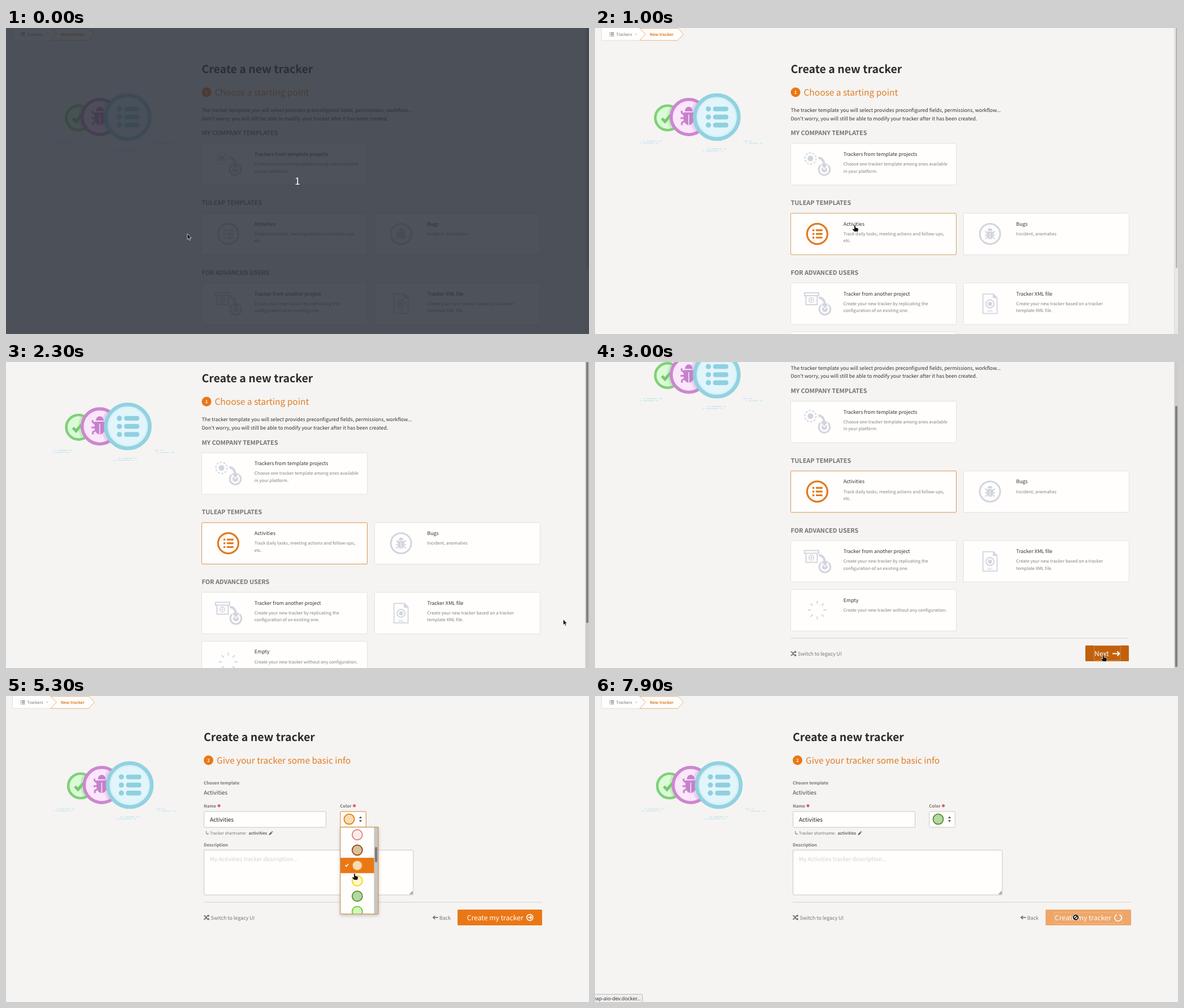
An HTML page that plays this animation: 1032 by 543 pixels, repeating every 8 s.

```html
<!DOCTYPE html>
<html lang="en">
<head>
<meta charset="utf-8">
<title>Create a new tracker</title>
<style>
html, body { margin: 0; width: 100%; height: 100%; overflow: hidden; background: #f5f4f2; }
svg { display: block; width: 100vw; height: 100vh; }
text { font-family: "Noto Sans CJK JP", "Noto Sans CJK SC", "Noto Sans CJK", "Open Sans", sans-serif; text-rendering: geometricPrecision; white-space: pre; }
</style>
</head>
<body>
<svg id="stage" viewBox="0 0 1032 543"></svg>
<script>
const LOOP = 8000, UNIT = 0.5528;
const ORANGE = '#ea7716', INK = '#333', MUTED = '#757575', ICON = '#d2d5de', WHITE = '#fffefd';

// Shape helpers
const text = (x, y, str, size = 16, fill = INK, weight = 400, extra = '') =>
  `<text x="${x}" y="${y}" font-size="${(size * UNIT * (weight > 400 ? 0.98 : 1)).toFixed(2)}" fill="${fill}" font-weight="${weight}" ${extra}>${str}</text>`;
const rect = (x, y, w, h, fill, extra = '') =>
  `<rect x="${x}" y="${y}" width="${w}" height="${h}" fill="${fill}" ${extra}/>`;
const disc = (x, y, r, fill, stroke = 'none', width = 0, extra = '') =>
  `<circle cx="${x}" cy="${y}" r="${r}" fill="${fill}" stroke="${stroke}" stroke-width="${width}" ${extra}/>`;
const line = (d, stroke, width = 1, extra = '') =>
  `<path d="${d}" fill="none" stroke="${stroke}" stroke-width="${width}" ${extra}/>`;
const fill = (d, color, extra = '') => `<path d="${d}" fill="${color}" ${extra}/>`;
const group = (id, body, extra = '') => `<g id="${id}" ${extra}>${body}</g>`;
const at = (x, y, body, scale = 1) => `<g transform="translate(${x} ${y}) scale(${scale})">${body}</g>`;
const ROUND = 'stroke-linecap="round" stroke-linejoin="round"';

// Icons, centred on 0,0
const bug = (color, gap) =>
  fill('M-7-9A7 8 0 0 1 7-9Z', color) +
  fill('M-9.5-7H9.5V4A9.5 12 0 0 1-9.5 4Z', color) +
  line('M-15 3.5H15M-9-3L-13-6.5V-10M9-3L13-6.5V-10M-8 9L-12.5 12V16M8 9L12.5 12V16', color, 3, 'stroke-linejoin="round"') +
  line('M0-3V16', gap, 1.6);

const list = (color, ring) => (ring ? disc(0, 0, 18, 'none', color, 3.2) : '') +
  [-6.6, 0, 6.6].map(y => disc(-6.8, y, 1.9, color) +
    rect(-2.6, y - 1.6, 12, 3.2, color, 'rx="1"')).join('');

const target = disc(0, 0, 9.8, 'none', ICON, 3) + disc(0, 0, 5, ICON);
const importArrow = (() => {
  const arc = 'M-10.5-20.5Q-1-20 0-8';
  const head = 'M-6.5-10H6.5L0-1.5Z';
  return target + line(arc, WHITE, 6) + fill(head, WHITE, `stroke="${WHITE}" stroke-width="3"`) +
    line(arc, ICON, 4) + fill(head, ICON);
})();

const templatesIcon = disc(-12, -10, 10, 'none', ICON, 2, 'stroke-dasharray="3.6 2.68"') +
  disc(-12, -10, 5, ICON) + at(12.5, 9.5, importArrow);
const projectIcon = line('M-22.5-19H2.5V-14H-22.5ZM-20-14V2H0V-14', ICON, 2) +
  disc(-10.5, -6.2, 4.3, 'none', ICON, 1.6) + disc(-10.5, -6.2, 1.8, ICON) + at(13.5, 9.8, importArrow);
const xmlIcon = line('M-12.5-17H6L12.5-10.5V17.5H-12.5Z', ICON, 1.8) + fill('M5-17V-9.5H12.5Z', ICON) +
  disc(0, 0.5, 7, 'none', ICON, 2) + disc(0, 0.5, 3.6, ICON) +
  text(0, 15.2, 'XML', 9, ICON, 700, 'text-anchor="middle"');
const emptyIcon = [...Array(8).keys()].map(i =>
  `<path d="M0-11V-16.5" stroke="${ICON}" stroke-width="2" transform="rotate(${i * 45})"/>`).join('');
const bugIcon = disc(0, 0, 18, 'none', ICON, 3) + at(0, 0, bug(ICON, WHITE), 0.6);

const shuffle = (x, y) => at(x, y,
  line('M0-3H2L6.5 3H8M0 3H2L6.5-3H8', '#666', 1.5) + fill('M7.5-5.4L10.3-3 7.5-.6ZM7.5 .6L10.3 3 7.5 5.4Z', '#666'));
const star = (x, y) => at(x, y, line('M0-2.8V2.8M-2.4-1.4L2.4 1.4M-2.4 1.4L2.4-1.4', '#d0555b', 1.5));
const caretPair = (x, y) => at(x, y, fill('M-2.7-1.6L0-5.2 2.7-1.6ZM-2.7 1.6L0 5.2 2.7 1.6Z', '#555'));

const breadcrumb =
  fill('M11.5 -3V20.5Q11.5 22 13 22H79L89.500 11 79 0V-3Z', WHITE, 'stroke="#dddbd9" stroke-width=".9"') +
  fill('M79 .5L89.500 11 79 22H145Q146.500 22 147 21.500L156.500 11 147 .5Z', WHITE, 'stroke="#e2aa6a" stroke-width=".9"') +
  line('M28 8.600H33.500M28 11.300H33.500M28 14H33.500', '#666', 1.2) + line('M26.300 7.700V9.500M25.500 11.300H27M25.500 14H27', '#666', 0.9) +
  text(37.5, 14.3, 'Trackers', 13, MUTED) + fill('M71-.6h3.600l-1.800 2z', '#bbb', 'transform="translate(0 11)"') +
  text(97, 14.3, 'New tracker', 13, '#de7d24', 600);

const dashes = (x, y, parts) => {
  let d = '';
  for (const [gap, len] of parts) { x += gap; d += `M${x} ${y}h${len}`; x += len; }
  return line(d, '#c5e4ee', 1.3);
};
const hero =
  disc(128.5, 159.5, 21.800, '#dafbd6', '#80d079', 4.6) +
  line('M118.500 160.500L124 166 133.500 155', '#75c96c', 5) +
  `<clipPath id="pinkInside"><circle cx="166" cy="158" r="28.500"/></clipPath>
   <clipPath id="greenInside"><circle cx="128.500" cy="159.500" r="19.500"/></clipPath>` +
  disc(166, 158, 38, '#80d079', 'none', 0, 'opacity=".3" clip-path="url(#greenInside)"') +
  disc(166, 158, 31.2, '#fbe6fb', '#cc87cf', 5.6) +
  disc(215.5, 158, 47, '#cc87cf', 'none', 0, 'opacity=".25" clip-path="url(#pinkInside)"') +
  at(166, 156.5, bug('#c681ca', '#fbe6fb'), 0.98) +
  disc(215.5, 158, 39, '#d6f0f7', '#92d2e0', 6.6) + disc(215.5, 158, 33, '#e2f5fb') +
  [143.6, 158, 172.2].map(y => disc(200.7, y, 4.6, '#8fd0df') + rect(209, y - 4.2, 27, 8.4, '#8fd0df', 'rx="4"')).join('') +
  dashes(85, 200.6, [[0, 3], [3, 19], [3, 5]]) + dashes(80, 204.1, [[0, 3], [3, 20], [2, 4]]) +
  dashes(262, 200.6, [[0, 9], [2, 5]]) + dashes(266, 204.3, [[0, 3], [3, 17], [3, 5]]) +
  dashes(199, 214.5, [[0, 4], [3, 18], [3, 5]]) + dashes(190.5, 218.1, [[0, 3], [3, 23], [3, 4]]);

const heading = (step, title) => hero +
  text(346.5, 79.5, 'Create a new tracker', 36, '#2b2b2b', 600) +
  disc(355, 114, 8.5, ORANGE) + text(355, 117.2, step, 14, '#fff', 600, 'text-anchor="middle"') +
  text(369.5, 120, title, 28, '#e07c24');

const card = (col, y, title, lines, icon, id = '') => {
  const x = 346.5 + col * 305.8;
  return rect(x, y, 293, 73.5, WHITE, `rx="1.5" stroke="#e4e2e0" ${id}`) +
    text(x + 93.3, y + 22, title) +
    lines.map((s, i) => text(x + 93.3, y + 39.2 + i * 12.4, s, 14, '#808080')).join('') +
    at(x + 46.9, y + 36.6, icon);
};
const section = (y, title) => text(346.5, y, title, 20, '#737373', 600);

const chooser = group('chooser', breadcrumb + heading(1, 'Choose a starting point') +
  text(346.5, 149, 'The tracker template you will select provides preconfigured fields, permissions, workflow...') +
  text(346.5, 163.7, 'Don’t worry, you will still be able to modify your tracker after it has been created.'.replace('’', "'")) +
  section(190.3, 'MY COMPANY TEMPLATES') +
  card(0, 205, 'Trackers from template projects', ['Choose one tracker template among ones available', 'in your platform.'], templatesIcon) +
  section(314.2, 'TULEAP TEMPLATES') +
  card(0, 328.8, 'Activities', ['Track daily tasks, meeting actions and follow-ups,', 'etc.'],
    group('listIdle', list(ICON, true)) + group('listActive', list('#e07a1f', true)), 'id="activityCard"') +
  card(1, 328.8, 'Bugs', ['Incident, anomalies'], bugIcon) +
  section(438, 'FOR ADVANCED USERS') +
  card(0, 452.5, 'Tracker from another project', ['Create your new tracker by replicating the', 'configuration of an existing one.'], projectIcon) +
  card(1, 452.5, 'Tracker XML file', ['Create your new tracker based on a tracker', 'template XML file.'], xmlIcon) +
  card(0, 539.2, 'Empty', ['Create your new tracker without any configuration.'], emptyIcon) +
  line('M346.500 625.500H945', '#d5d3d1') +
  shuffle(346.5, 653) + text(359, 656.7, 'Switch to legacy UI', 16, MUTED) +
  rect(868, 638.5, 77, 28, ORANGE, 'rx="1.5" id="nextButton"') +
  rect(883.5, 639, 46.5, 26, 'none', 'id="nextFocus" stroke="#f0c9a0" stroke-width=".8" stroke-dasharray="1 1"') +
  text(884, 657.7, 'Next', 22, '#fff') + line('M916 653H928M924.500 649L928.500 653 924.500 657', '#fff', 1.9));

const scrollbar = group('scrollbar', rect(1025, 0, 7, 543, '#e9e7e5', 'id="track"') +
  line('M1025.500 0V543', '#dddbd8') + rect(1028, -37, 3, 463, '#bab8b6', 'rx="1.5" id="thumb"'));

// Colour picker
const SWATCHES = [['#dd8b8d', '#fbecec'], ['#8c5521', '#dcc096'], ['#e28a1b', '#f9dbb4'],
  ['#fbd50f', '#fff7d0'], ['#5f9339', '#b3d9a0'], ['#6dd032', '#d5f5be']];
const ROW = 27.25, MENU_TOP = 232.6;
const swatch = (x, y, [edge, inner]) => disc(x, y, 9, inner, edge, 2);
const menu = group('menu',
  rect(592, 233, 67, 154, WHITE, 'filter="url(#shadow)"') +
  `<clipPath id="menuClip"><rect x="592" y="233" width="67" height="153.500"/></clipPath><g clip-path="url(#menuClip)">` +
  rect(592, 0, 60, ROW, ORANGE, 'id="menuHover"') +
  SWATCHES.map((c, i) => swatch(621.8, MENU_TOP + ROW * (i + 0.5), c)).join('') +
  line('M600.500 300.200L602.500 302.300 606 298', '#fff', 1.6, 'id="menuCheck"') +
  rect(651.5, 233, 8, 154, '#c8c5c2') + rect(653, 268, 4.2, 27, '#7b7a78', 'rx="2"') + '</g>' +
  rect(591.8, 232.8, 67.2, 154, 'none', 'stroke="#d0843c"'));

const label = (x, y, str) => text(x, y, str, 14, MUTED, 600);
const field = (x, y, w, h, id = '') => rect(x, y, w, h, WHITE, `rx="1.5" stroke="#cac8c6" ${id}`);
const form = group('form', breadcrumb + `<g transform="translate(3.500 0)">${heading(2, 'Give your tracker some basic info')}</g>` +
  label(350, 157.4, 'Chosen template') + text(350, 175.4, 'Activities', 18, '#444') +
  label(350, 198.4, 'Name') + star(377, 194.8) + field(350.5, 205, 216, 28) + text(361, 223, 'Activities', 18, '#222') +
  label(591.3, 198.4, 'Color') + star(616.6, 194.8) + field(591.8, 205, 45.5, 28, 'id="picker"') +
  group('before', swatch(607.5, 218.6, SWATCHES[2])) + group('after', swatch(607.5, 218.6, SWATCHES[4])) + caretPair(627.5, 218.6) +
  line('M354.500 239.500V244.600H358M356.600 243L358.300 244.600 356.600 246.200', '#777', 0.9) +
  text(361, 246.3, 'Tracker shortname:', 13, MUTED) + text(429.5, 246.3, 'activities', 13.4, '#666', 700) +
  fill('M465.300 246.900L465.900 244.400 469.300 241 471.200 242.900 467.800 246.300ZM470 240.300L470.900 239.600 472.600 241.300 471.900 242.200Z', '#666') +
  label(350, 267, 'Description') + field(350.5, 273.5, 370.5, 79.5) +
  text(361, 292.6, 'My Activities tracker description...', 18, '#d3d1cf') + fill('M720 345.500V352H713.500Z', '#aaa') +
  line('M350 366H949', '#d5d3d1') + shuffle(350, 393) + text(362.5, 397, 'Switch to legacy UI', 16, MUTED) +
  group('back', line('M765 393H757M759.500 390L756 393 759.500 396', '#666', 1.5) + text(767, 397, 'Back', 16, MUTED)) +
  group('create', rect(799.3, 379, 149.700, 28, ORANGE, 'rx="1.5" id="createButton"') +
    group('createLabel', text(816, 398, 'Create my tracker', 22, '#fff') +
      rect(815.5, 384, 120, 20, 'none', 'id="createFocus" stroke="#f6d6b6" stroke-width=".7" stroke-dasharray="1 1"')) +
    group('goIcon', disc(927.3, 393, 5.400, 'none', '#fff', 1.6) + line('M924 393H930M927.600 390.300L930.300 393 927.600 395.700', '#fff', 1.6)) +
    group('spinner', line('M2.200-5.600A6 6 0 1 1-2.200-5.600', '#fff', 1.7))) + menu);

const statusBar = group('status', rect(-2, 529.3, 86, 16, '#f0efed', 'rx="2" stroke="#b9b7b5"') +
  `<text x="81" y="540.200" text-anchor="end" font-size="8.800" fill="#333" style="font-family:'Noto Sans','Open Sans',sans-serif">tuleap-aio-dev.docker...</text>`);
const countdown = group('countdown', rect(0, 0, 1032, 543, '#2b3039', 'opacity=".83"') +
  text(515.8, 278, '1', 32, '#fff', 400, 'text-anchor="middle"'));
const cursor = group('cursor',
  group('arrow', fill('M0 0V10.200L2.300 8.100 3.900 11.800 5.600 11 4 7.500H7Z', '#111', 'stroke="#fff" stroke-width=".7"')) +
  group('hand', fill('M-1.400 .4Q0-1 1.300 .5V4L5 5Q6.800 5.600 6.300 8L5.300 11.500H-1L-4.300 7.400Q-4.600 5.600-2.800 6.200L-1.400 7Z', '#111', 'stroke="#fff" stroke-width=".7"')) +
  group('deny', disc(0, 0, 5.600, '#fff') + disc(0, 0, 4, 'none', '#111', 2) + line('M-2.700 2.700L2.700-2.700', '#111', 1.7)));

document.getElementById('stage').innerHTML =
  `<filter id="shadow" x="-30%" y="-30%" width="160%" height="160%"><feDropShadow dx="0" dy="2" stdDeviation="3" flood-opacity=".25"/></filter>` +
  rect(0, 0, 1032, 543, '#f5f4f2') + chooser + scrollbar + form + statusBar + countdown + cursor;

const $ = id => document.getElementById(id);
const show = (id, on) => $(id).setAttribute('display', on ? 'inline' : 'none');
const set = (id, attrs) => { for (const k in attrs) $(id).setAttribute(k, attrs[k]); };
const move = (id, x, y = 0, turn = 0) => set(id, { transform: `translate(${x} ${y}) rotate(${turn})` });
const within = (t, a, b) => t >= a && t < b;

// Pointer stops: time, x, y
const PATH = [
  [0, 321, 365], [200, 321, 365], [300, 330, 365], [400, 390, 362], [500, 444, 358], [700, 444, 358],
  [800, 460, 350], [1600, 460, 350], [1700, 700, 400], [1800, 930, 430], [1900, 1014, 436], [2200, 1014, 436],
  [2600, 903, 518], [2900, 900, 520], [3800, 900, 520], [3900, 673, 368], [4100, 640, 270], [4300, 622, 232],
  [4600, 620, 219], [5000, 620, 220], [5100, 619, 250], [5200, 618, 290], [5300, 617, 315], [5500, 617, 335],
  [5700, 617, 354], [5800, 617, 354], [5900, 618, 365], [6400, 618, 365], [6500, 640, 368], [6700, 780, 385],
  [7000, 851, 393], [8000, 851, 393]];

function pointer(t) {
  const i = PATH.findIndex(p => p[0] > t);
  const [t0, x0, y0] = PATH[i - 1], [t1, x1, y1] = PATH[i];
  const p = (t - t0) / (t1 - t0);
  return [x0 + (x1 - x0) * p, y0 + (y1 - y0) * p];
}

function ease(t, from, to) {
  const p = Math.min(1, Math.max(0, (t - from) / (to - from)));
  return p * p * p * (p * (p * 6 - 15) + 10);
}

function render(time) {
  const t = Math.floor(time / 100) * 100;
  const [x, y] = pointer(t);
  const second = t >= 3200;
  show('countdown', t < 300);
  show('chooser', !second);
  show('scrollbar', !second);
  show('form', second);

  const scroll = 135.5 * ease(t, 2030, 2700);
  const barHover = t >= 2100;
  move('chooser', 0, -scroll);
  set('track', { fill: barHover ? '#cfccc8' : '#e9e7e5' });
  set('thumb', { x: barHover ? 1027 : 1028, width: barHover ? 4 : 3,
    y: -37 + 115 * scroll / 135.5, fill: barHover ? '#80807e' : '#bab8b6' });
  set('activityCard', { stroke: t < 500 ? '#e4e2e0' : t < 2200 ? '#cfa35f' : '#d9944f' });
  show('listIdle', t < 1000);
  show('listActive', t >= 1000);
  set('nextButton', { fill: t >= 2900 ? '#c1600d' : t >= 2600 ? '#d66b11' : ORANGE });
  show('nextFocus', t >= 2900);

  const picked = t >= 6500, loading = t >= 7500;
  const row = y < 232 ? 2 : Math.min(4, Math.floor((y - 1.5 - MENU_TOP) / ROW));
  show('menu', within(t, 4700, 6500));
  set('menuHover', { y: MENU_TOP + ROW * row });
  set('menuCheck', { stroke: row === 2 ? '#fff' : '#666' });
  set('picker', { stroke: within(t, 4800, 7400) ? '#d0843c' : '#cac8c6' });
  show('before', !picked);
  show('after', picked);

  move('back', loading ? -2 : 0);
  move('createLabel', loading ? -2 : 0);
  set('create', { opacity: loading ? 0.62 : 1 });
  set('createButton', { x: loading ? 797.5 : 799.3, width: loading ? 151.5 : 149.7,
    fill: loading ? ORANGE : t >= 7400 ? '#c1600d' : t >= 6800 ? '#d66b11' : ORANGE });
  show('createFocus', t >= 7400);
  show('goIcon', !loading);
  show('spinner', loading);
  move('spinner', 926, 393.5, (t - 7900) * 0.18);
  show('status', loading);

  const hand = within(t, 400, 1700) || within(t, 2600, 3200) || within(t, 4300, 6500) || within(t, 6800, 7500);
  move('cursor', x, y);
  show('hand', hand);
  show('deny', loading);
  show('arrow', !hand && !loading);
}

const start = performance.now();
function tick() {
  render((performance.now() - start) % LOOP);
  requestAnimationFrame(tick);
}
tick();
</script>
</body>
</html>
```
